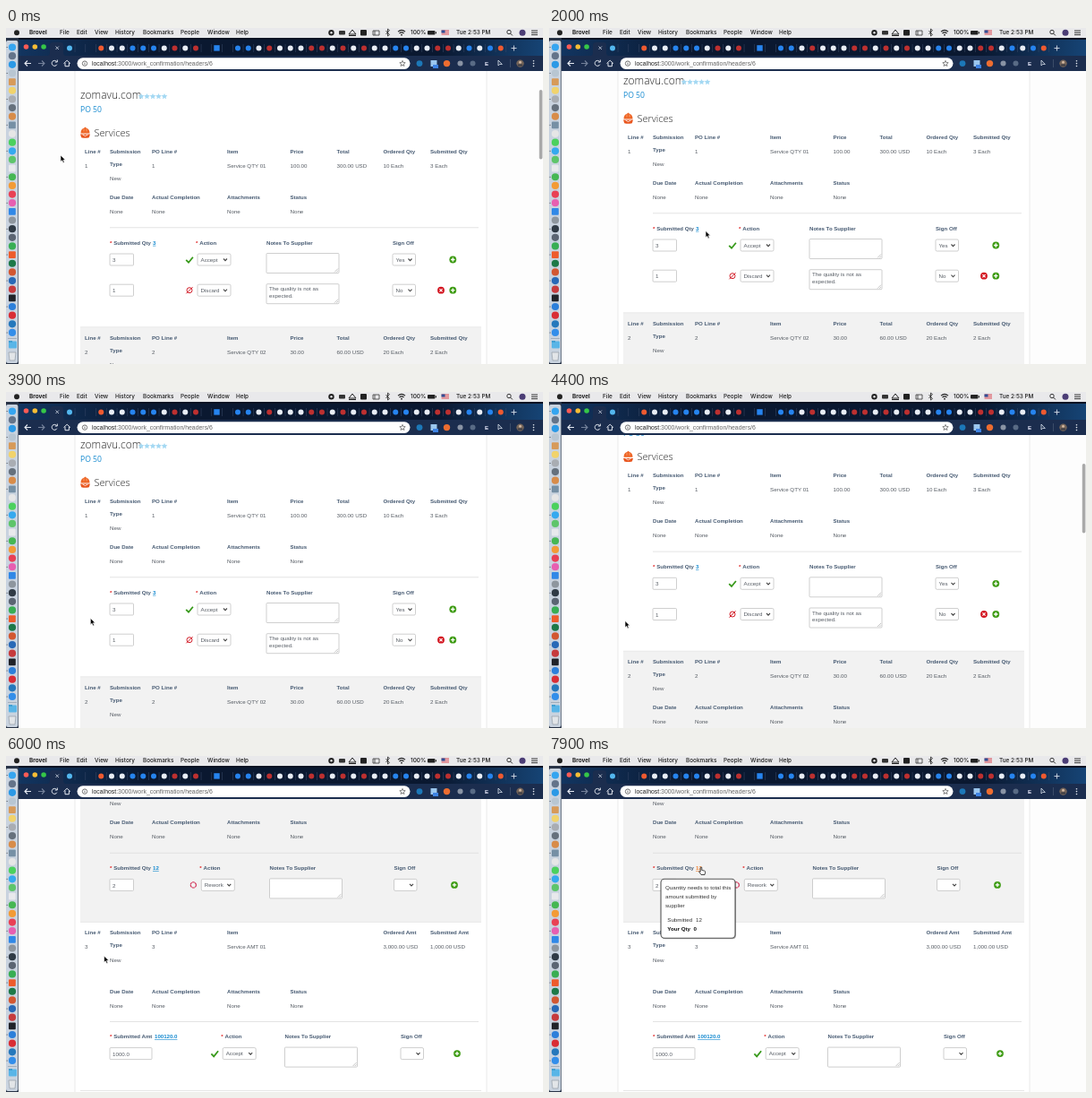
These frames come from a looping animation (600x375 px, 8 s). An HTML page:

```html
<!DOCTYPE html>
<html lang="en">
<head>
<meta charset="utf-8">
<title>Work confirmation</title>
<style>
html, body { margin: 0; width: 100%; height: 100%; overflow: hidden; background: #fff; }
svg { display: block; width: 600px; height: 375px; }
text { font: 6.2px "Liberation Sans", Arial, sans-serif; fill: #555b63; white-space: pre; }
.b { font-weight: 700; font-size: 6.1px; fill: #465a72; }
.link { fill: #1389cf; text-decoration: underline; text-decoration-thickness: .8px; }
.hot { fill: #f08030; }
.req { fill: #e02020; font-weight: 700; }
.title { font: 300 12px "Open Sans", sans-serif; fill: #222; }
.head { font: 300 11px "Open Sans", sans-serif; fill: #222; }
.po { font: 8.6px "Open Sans", sans-serif; fill: #1389cf; }
.menu { font: 500 6.4px Inter, sans-serif; fill: #1c1c1c; }
.app { font-weight: 700; }
.url { font-size: 6.9px; fill: #666; }
.tip { fill: #333; }
.strong { font-weight: 700; fill: #111; }
</style>
</head>
<body>
<svg id="stage" viewBox="0 0 600 375"></svg>
<script>
const box = (x, y, w, h, fill, more = '') =>
  `<rect x="${x}" y="${y}" width="${w}" height="${h}" fill="${fill}" ${more}/>`;
const dot = (x, y, r, fill, more = '') =>
  `<circle cx="${x}" cy="${y}" r="${r}" fill="${fill}" ${more}/>`;
const line = (d, color, w = 1, more = '') =>
  `<path d="${d}" fill="none" stroke="${color}" stroke-width="${w}" ${more}/>`;
// Text is placed by its vertical middle.
const text = (x, y, s, cls = '') => `<text x="${x}" y="${y + 2.2}" class="${cls}">${s}</text>`;
const row = (y, cells, cls) => cells.map(([x, s]) => text(x, y, s, cls)).join('');

// Form controls
const frame = 'stroke="#bbb" stroke-width=".7"';
const field = (x, y, w, h, s = '') => box(x, y, w, h, '#fff', 'rx="1" ' + frame) + text(x + 3, y + 7, s);
const select = (x, y, w, s = '') =>
  box(x, y - 6.5, w, 13, '#fff', 'rx="1.5" ' + frame) + text(x + 3.5, y, s) +
  line(`M${x + w - 8} ${y - 1}l2 2.1 2-2.1`, '#444', 1.1);
const area = (x, y, s = []) =>
  box(x, y - 7, 81, 22, '#fff', 'rx="1" ' + frame) +
  s.map((l, i) => text(x + 3, y - 1.5 + i * 7.2, l)).join('') +
  line(`M${x + 76} ${y + 14}l4-4M${x + 78.3} ${y + 14}l1.7-1.7`, '#888', .5);
const plus = (x, y) => dot(x, y, 3.9, '#3f9c14') +
  line(`M${x - 2.2} ${y}h4.4M${x} ${y - 2.2}v4.4`, '#fff', 1.3);
const cross = (x, y) => dot(x, y, 3.9, '#d3141f') +
  line(`M${x - 1.6} ${y - 1.6}l3.2 3.2m0-3.2l-3.2 3.2`, '#fff', 1.2);
const marks = {
  Accept: (x, y) => line(`M${x - 3.8} ${y + .3}l2.8 2.9 4.9-6`, '#37991a', 1.8),
  Discard: (x, y) => dot(x, y, 3, 'none', 'stroke="#d3202c"') +
    line(`M${x - 3.6} ${y + 3.6}l7.2-7.2`, '#d3202c'),
  Rework: (x, y) => dot(x, y, 3.1, 'none', 'stroke="#d02850" stroke-width="1.1" stroke-dasharray="2.8 .45"')
};
const required = (x, y, s) => text(x, y, '*', 'req') + text(x + 4.3, y, s, 'b');

function entry(y, f, { w = 26.5, value, action, sign = '', notes, removable }) {
  return field(116, y - 6.5, w, 13, value) + marks[action](f.mark, y) +
    select(f.mark + 9, y, 37, action) + area(f.notes, y, notes) +
    select(f.sign, y, 25.5, sign) + plus(f.plus, y) + (removable ? cross(486, y) : '');
}

function item(y, n, heads, values, f, entries, extra = 0) {
  const d = y + 51.2 + extra;
  return row(y, [[88, 'Line #'], [116, 'Submission'], [163, 'PO Line #'], [247, 'Item'], ...heads], 'b') +
    text(116, y + 14, 'Type', 'b') + row(y + 16, [[88, n], [163, n], ...values]) + text(116, y + 30.3, 'New') +
    row(d, [[116, 'Due Date'], [163, 'Actual Completion'], [247, 'Attachments'], [317.5, 'Status']], 'b') +
    row(d + 16, [116, 163, 247, 317.5].map(x => [x, 'None'])) +
    box(116, d + 33.6, 412, .8, '#ddd') +
    required(116, d + 50.8, f.label) + `<g id="total${n}">${text(f.link, d + 50.8, f.total, 'b link')}</g>` +
    required(f.mark + 7, d + 50.8, 'Action') + text(f.notes, d + 50.8, 'Notes To Supplier', 'b') +
    text(f.sign, d + 50.8, 'Sign Off', 'b') +
    entries.map((e, i) => entry(d + 69.7 + i * 34.2, f, e)).join('');
}

const qtyHeads = [[317.5, 'Price'], [369.5, 'Total'], [421.5, 'Ordered Qty'], [474, 'Submitted Qty']];
const amtHeads = [[421.5, 'Ordered Amt'], [474, 'Submitted Amt']];

function page() {
  let s = box(77, 0, 460, 900, '#fff', 'stroke="#e4e4e4" stroke-width=".8"');
  s += `<text x="83" y="79" class="title">zomavu.com</text>`;
  for (let i = 0; i < 5; i++) {
    const p = [...Array(10).keys()].map(k => {
      const a = k * Math.PI / 5, r = k % 2 ? 1.7 : 3.5;
      return [151 + i * 6.5 + r * Math.sin(a), 76.4 - r * Math.cos(a)];
    });
    s += `<polygon points="${p.join(' ')}" fill="#a5d9f3"/>`;
  }
  s += `<text x="83" y="94" class="po">PO 50</text>`;
  // Hard hat
  s += `<path d="M83.5 117.5q0-4.5 3.5-5.7l1.5-1.3 1.5 1.3q3.5 1.2 3.5 5.7z" fill="#ee6526"/>` +
    line('M87 112.5v3M90 112.5v3', '#ffc39d', .6) +
    `<path d="M83 118.6h11l-1.2 3.6q-4.3 1-8.6 0z" fill="#e95720"/>` + line('M85.5 119l3 1.5 3-1.5', '#fff', .8);
  s += `<text x="98.5" y="121.2" class="head">Services</text>`;
  s += item(137.6, 1, qtyHeads,
    [[247, 'Service QTY 01'], [317.5, '100.00'], [369.5, '300.00 USD'], [421.5, '10 Each'], [474, '3 Each']],
    { label: 'Submitted Qty', link: 164, total: '3', mark: 205, notes: 291, sign: 432, plus: 499.3 },
    [{ value: '3', action: 'Accept', sign: 'Yes' },
     { value: '1', action: 'Discard', sign: 'No', notes: ['The quality is not as', 'expected.'], removable: true }]);
  s += box(83, 334, 448, 174, '#f2f2f2') + box(83, 333.5, 448, .7, '#e2e2e2') + box(83, 507.5, 448, .7, '#e2e2e2');
  s += item(345.6, 2, qtyHeads,
    [[247, 'Service QTY 02'], [317.5, '30.00'], [369.5, '60.00 USD'], [421.5, '20 Each'], [474, '2 Each']],
    { label: 'Submitted Qty', link: 164, total: '12', mark: 209.3, notes: 294.5, sign: 433.5, plus: 501 },
    [{ value: '2', action: 'Rework' }]);
  s += item(519.8, 3, amtHeads,
    [[247, 'Service AMT 01'], [421.5, '3,000.00 USD'], [474, '1,000.00 USD']],
    { label: 'Submitted Amt', link: 166, total: '100120.0', mark: 233.2, notes: 311.5, sign: 441, plus: 504 },
    [{ w: 47, value: '1000.0', action: 'Accept' }], 14);
  return s + box(83, 695.5, 448, .8, '#ddd');
}

function menuBar() {
  let s = box(0, 0, 600, 11, '#e9e9eb') + dot(12, 5.2, 3, '#222') + text(26, 5.2, 'Brovel', 'menu app');
  s += row(5.2, [[60, 'File'], [79, 'Edit'], [99, 'View'], [122, 'History'], [153, 'Bookmarks'], [195, 'People'],
    [225, 'Window'], [257, 'Help'], [452, '100%'], [503, 'Tue 2:53 PM']], 'menu');
  s += dot(363.5, 5.3, 3.2, '#222') + dot(363.5, 5.3, 1.2, '#e9e9eb') +
    box(372, 3, 7, 4.5, '#333', 'rx="1"') + line('M383 7l4-5 4 5zM383 8.5h8', '#222', 1) +
    box(396, 2, 7, 6.5, '#222', 'rx="1"') +
    line('M410 3h7v5h-7zM412 3v5', '#333', .8) +
    line('M424.5 3l4 4.5-2 1.5v-8l2 1.5-4 4.5', '#222', .8) +
    line('M438 4.2q4-3.8 8 0M439.5 6q2.5-2.2 5 0', '#222', 1.1) + dot(442, 7.7, .9, '#222');
  s += box(471, 3, 8.5, 4.5, '#222', 'rx="1"') + box(480, 4.3, 1, 2, '#222');
  s += box(486.5, 2.5, 8.5, 5.5, '#fff') +
    [0, 2, 4].map(i => box(486.5, 2.5 + i, 8.5, 1, '#c83540')).join('') + box(486.5, 2.5, 4, 3, '#304f96');
  return s + dot(562, 4.5, 2.2, 'none', 'stroke="#222" stroke-width=".9"') + line('M563.7 6.2l2.2 2.2', '#222', 1) +
    dot(577, 5.2, 3.5, '#4b3d75') + line('M587 3h7M587 5.3h7M587 7.6h7', '#222', .9);
}

function browser() {
  const hues = { w: '#e8edf5', b: '#2684ef', r: '#bd3030', o: '#ee5a30', c: '#53b7ee' };
  const tabs = 'c  owwbbbwrwr b bbwrwwwrrwrwrwwbbwwrrwbwbo';
  let s = `<linearGradient id="sky"><stop stop-color="#123560"/><stop offset=".25" stop-color="#0a1830"/>
    <stop offset=".8" stop-color="#0a1830"/><stop offset="1" stop-color="#164475"/></linearGradient>` +
    box(14, 11, 586, 21, 'url(#sky)') + box(14, 11, 586, 2, '#0a1222') + box(14, 31, 586, 17, '#1b2d4e') +
    `<path d="M46 31q3 0 3-4v-8q0-3 3-3h9q3 0 3 3v8q0 4 3 4z" fill="#1b2d4e"/>`;
  ['#fb5b55', '#f7bd35', '#35c748'].forEach((c, i) => s += dot(22.5 + i * 9.8, 21, 2.8, c));
  s += line('M55.5 20.5l3.5 3.5m0-3.5l-3.5 3.5', '#d4dbe6', .8);
  [...tabs].forEach((k, i) => {
    const x = 71 + i * 11.75;
    s += box(x + 5.8, 18, .5, 9, '#3a4b69');
    if (k !== ' ') s += i === 14 ? box(x - 3.2, 19.2, 6.4, 6.4, hues.b) : dot(x, 22.4, 3, hues[k]);
  });
  s += line('M567.5 19.5v6m-3-3h6', '#d4dbe6', .9);
  s += line('M28 39.5h-7m3-3l-3 3 3 3', '#e6eaf2', 1.1) + line('M36 39.5h7m-3-3l3 3-3 3', '#74819a', 1.1) +
    line('M56.6 37.5a3 3 0 1 0 .3 3.2M57.3 35.5v2.5h-2.5', '#e6eaf2', 1) +
    line('M64.5 39.6l3.7-3.4 3.7 3.4M66 39v3.7h4.4V39', '#e6eaf2', 1);
  s += box(79.5, 33.3, 372, 12.6, '#fff', 'rx="6.3"') + dot(88, 39.6, 2.7, 'none', 'stroke="#555" stroke-width=".8"') +
    line('M88 39v2M88 37.8v.6', '#555', .8);
  s += `<text x="96" y="42" class="url"><tspan fill="#222">localhost</tspan>:3000/work_confirmation/headers/6</text>`;
  s += line('M443 36.4l.9 2.2 2.3.1-1.8 1.5.6 2.3-2-1.3-2 1.3.6-2.3-1.8-1.5 2.3-.1z', '#555', .7);
  s += dot(462, 39.6, 3.4, '#1c78b8') + box(474.5, 36, 7, 7, '#9bc7ee') + box(477, 41, 6, 4, '#3e83e3') +
    dot(492.5, 39.6, 3.7, '#ed6d30') + dot(507.5, 39.6, 3, '#8993a4') + dot(521.5, 39.6, 3, '#596b85') +
    `<text x="535" y="42" style="font-weight:700;fill:#eef">E</text>` +
    line('M550 36v6l1.7-1.6 2.6.1z', '#dfe6f0', .8) + box(563, 35, .6, 9, '#53627b') +
    dot(574.5, 39.6, 4.2, '#75655a') + dot(574.5, 38.3, 1.5, '#d1b69f') + box(571.8, 40.4, 5.4, 2, '#3c3d45', 'rx="1"');
  return s + [36.7, 39.6, 42.5].map(y => dot(589.5, y, .8, '#e6eaf2')).join('');
}

function dock() {
  const hues = ('#35a5f0 #64748a #2b99e6 #b8c6d2 #d79a59 #f1d36c #a9adb3 #66717d #d88c49 #7690a5 #e6e6e6 ' +
    '#4bd15e #36a9ef #5ec56b #e8e9ec #46b753 #f39b36 #e94055 #e75fb1 #3088e7 #8e969e #303b46 #5b6573 ' +
    '#38ae54 #ee5b2c #1d7948 #d25731 #2869b7 #c63b3d #202329 #2c7fda #d92d35 #2578bc #338eea').split(' ');
  let s = box(0, 11, 14, 364, '#293447') + box(0, 14, 13.4, 360, '#c9d3df', 'rx="2"');
  hues.forEach((c, i) => {
    const y = 21.5 + i * 9.65;
    s += (i % 5 === 4 ? box(3, y - 3.8, 7.8, 7.8, c, 'rx="1"') : dot(7, y, 4.1, c)) +
      (i % 3 === 0 ? dot(1.1, y, .5, '#222') : '');
  });
  return s + box(2, 346, 10, .5, '#7d8994') + box(3, 349.5, 9, 8, '#59b5e7', 'rx="1"') +
    box(3, 349, 4, 2, '#419fd2') + `<path d="M3 362h8l-1 9H4z" fill="#e2e5e8" stroke="#89939d" stroke-width=".6"/>`;
}

const tip = box(126, 138.2, 83, 66, '#0005', 'rx="4"') +
  box(125, 137.2, 83, 66, '#fff', 'rx="4" stroke="#555" stroke-width="1.1"') +
  row(147.2, [[130, 'Quantity needs to total this']], 'tip') + text(130, 157.2, 'amount submitted by', 'tip') +
  text(130, 167.2, 'supplier', 'tip') + row(183, [[132.3, 'Submitted'], [164, '12']], 'tip') +
  row(193, [[132.3, 'Your Qty'], [161.5, '0']], 'tip strong');
const arrow = '<path d="M0 0v7.2l1.7-1.5 1.2 2.7 1.3-.6L3 5.2h2.3z" fill="#000" stroke="#fff" stroke-width=".6"/>';
const hand = '<path d="M-.8 0q.8-.8 1.6 0v3l3 .7q1 .3.8 1.5L4 8H0L-2.4 4.5q.7-.8 1.6.2z" fill="#fff" stroke="#000" stroke-width=".7"/>';

const $ = id => document.getElementById(id);
$('stage').innerHTML = box(0, 0, 600, 375, '#fdfdfd') + `<g id="page">${page()}</g>` +
  box(595.8, 69, 3.6, 77.5, '#a9a9a9', 'id="thumb" rx="1.8"') +
  browser() + menuBar() + dock() + `<g id="tip">${tip}</g>` +
  `<g id="arrow">${arrow}</g><g id="hand">${hand}</g>`;

// Keys: time, then values
const scrollKeys = [[0, 0], [200, 0], [600, 16], [4200, 16], [4400, 44.7], [4700, 255], [4900, 316], [5000, 322.6]];
// The overlay scrollbar fades once scrolling has stopped.
const thumbKeys = [[0, 1], [1200, 1], [1500, 0], [4100, 0], [4200, 1], [5600, 1], [5900, 0]];
const mouseKeys = [[0, 61, 142], [200, 61, 142], [900, 200.5, 244.5], [1700, 175, 226.5], [3100, 175, 226.5],
  [4100, 85, 255.5], [4400, 85, 255.5], [5000, 88.5, 250], [5600, 88.5, 250], [6900, 182, 131], [7300, 170, 124.5]];

function at(keys, t, ease = u => u) {
  const i = keys.findIndex(k => k[0] > t);
  if (i < 0) return keys[keys.length - 1].slice(1);
  const [a, b] = [keys[i - 1], keys[i]];
  const u = ease((t - a[0]) / (b[0] - a[0]));
  return a.slice(1).map((v, j) => v + (b[j + 1] - v) * u);
}

const show = (id, on) => $(id).style.display = on ? '' : 'none';

function draw() {
  const t = Math.floor(performance.now() % 8000 / 100) * 100;
  const [scroll] = at(scrollKeys, t);
  const [x, y] = at(mouseKeys, t, u => u * u * (3 - 2 * u));
  const over = t >= 7300;
  $('page').setAttribute('transform', `translate(0 ${-scroll})`);
  $('thumb').setAttribute('y', 69 + scroll * .245);
  $('thumb').setAttribute('opacity', at(thumbKeys, t)[0]);
  for (const id of ['arrow', 'hand']) $(id).setAttribute('transform', `translate(${x} ${y})`);
  show('arrow', !over);
  show('hand', over);
  show('tip', t >= 7400);
  $('total2').firstChild.classList.toggle('hot', over);
  requestAnimationFrame(draw);
}
draw();
</script>
</body>
</html>
```
